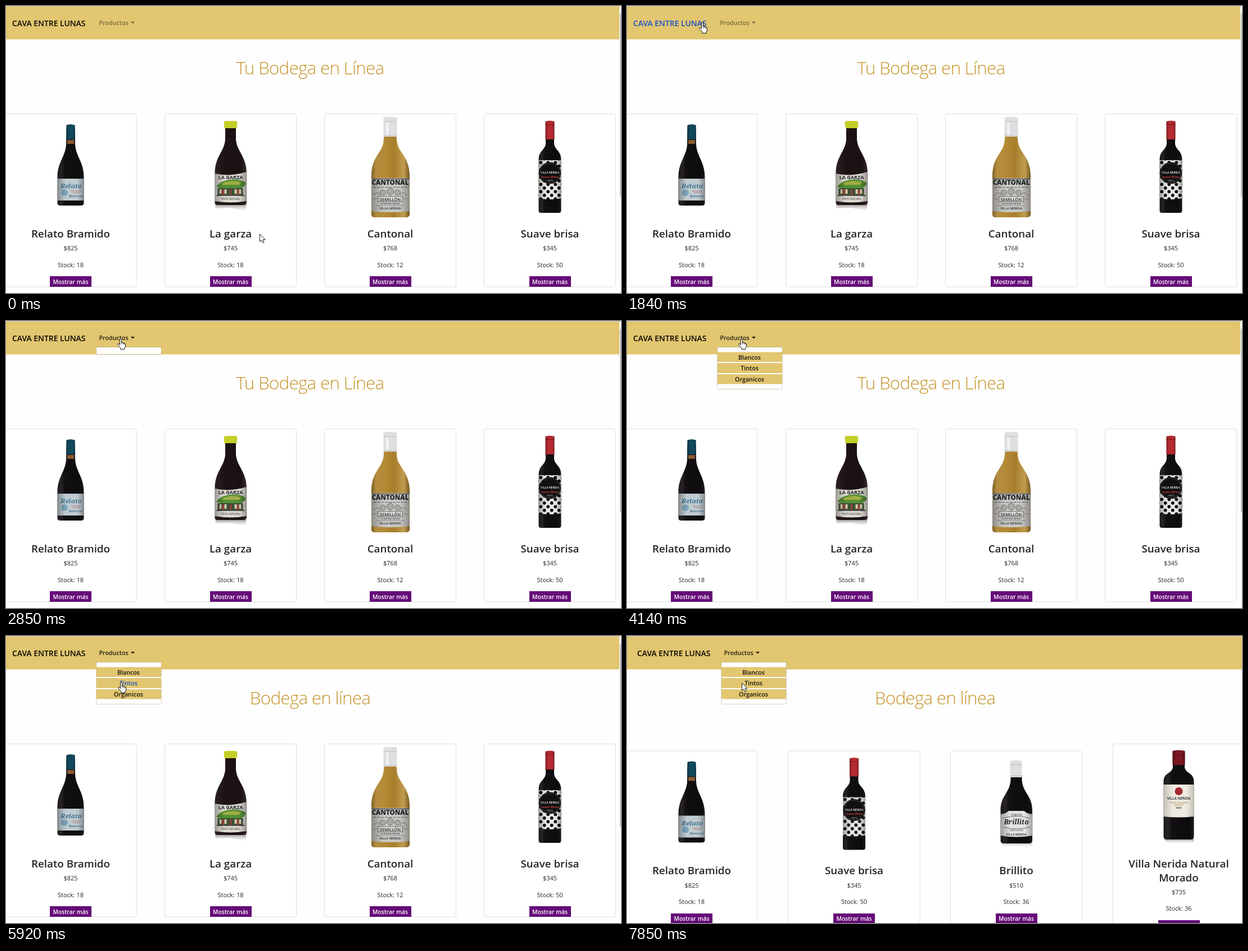
An HTML page that plays this animation: 1094x512 px, repeating every 8000 ms.

```html
<!DOCTYPE html>
<html lang="es">
<head>
<meta charset="utf-8">
<title>Bodega en línea</title>
<style>
  html, body { margin: 0; width: 100%; height: 100%; overflow: hidden; background: #fefefe; }
  svg { display: block; }
  text { font-family: "Open Sans", "Noto Sans", sans-serif; fill: #212529; white-space: pre; }
  .mid, .card text, .label text { text-anchor: middle; }
  .brand { font-size: 13.9px; font-weight: 600; fill: #080600; }
  .toggle { font-size: 10.7px; font-weight: 600; fill: inherit; }
  .title { font-size: 31.5px; font-weight: 300; letter-spacing: -.8px; fill: #c6952b; }
  .item { font-size: 10.7px; font-weight: 600; fill: #16140e; }
  .name { font-size: 18.8px; font-weight: 600; }
  .info { font-size: 11px; }
  .card .more { font-size: 10.3px; font-weight: 600; fill: #fff; }
  .label text { font-size: 6px; }
  .label .script { font-family: "Noto Serif", serif; font-style: italic; font-weight: 700; }

  .step { animation: 8s step-end infinite; }
  #front { animation-name: front; }
  #category { animation-name: category; }
  #header { animation-name: header; }
  #titleA { animation-name: titleA; }
  #titleB { animation-name: titleB; }
  #stub { animation-name: stub; }
  #menu { animation-name: menu; }
  #brand { animation-name: brand; }
  #toggle { animation-name: toggle; }
  #whites { animation-name: whites; }
  #reds { animation-name: reds; }
  #cursor { animation-name: cursor; }
  #arrow { animation-name: arrow; }
  #hand { animation-name: hand; }

  @keyframes front { 0% { visibility: visible } 77.875%, 100% { visibility: hidden } }
  @keyframes category { 0% { visibility: hidden } 77.875%, 100% { visibility: visible } }
  @keyframes header { 0% { transform: none } 77.875%, 100% { transform: translateX(7px) } }
  @keyframes titleA { 0% { visibility: visible } 74%, 100% { visibility: hidden } }
  @keyframes titleB { 0% { visibility: hidden } 74%, 100% { visibility: visible } }
  @keyframes stub { 0% { visibility: hidden } 33.875% { visibility: visible } 51.75%, 100% { visibility: hidden } }
  @keyframes menu { 0% { visibility: hidden } 51.75%, 100% { visibility: visible } }
  @keyframes brand { 0% { fill: #080600 } 15.75% { fill: #1c4fc8 } 24.875%, 100% { fill: #080600 } }
  @keyframes toggle { 0% { fill: #7a6a3c } 26.5% { fill: #4c4222 } 35.625%, 100% { fill: #231e10 } }
  @keyframes whites { 0% { fill: #16140e } 63.25% { fill: #1c4fc8 } 66.75%, 100% { fill: #16140e } }
  @keyframes reds { 0% { fill: #16140e } 66.75% { fill: #1c4fc8 } 77.875%, 100% { fill: #16140e } }
  @keyframes arrow { 0% { visibility: visible } 15.75% { visibility: hidden } 77.875%, 100% { visibility: visible } }
  @keyframes hand { 0% { visibility: hidden } 15.75% { visibility: visible } 77.875%, 100% { visibility: hidden } }
  @keyframes cursor {
    0% { transform: translate(451px, 406px) }
    6.25% { transform: translate(451px, 405px) }
    8.875% { transform: translate(392px, 280px) }
    10.5% { transform: translate(298px, 124px) }
    12.375% { transform: translate(158px, 44px) }
    14% { transform: translate(162px, 47px) }
    15.75% { transform: translate(115px, 29px) }
    17.625% { transform: translate(107px, 27px) }
    23% { transform: translate(128px, 29px) }
    24.875% { transform: translate(158px, 31px) }
    26.5% { transform: translate(195px, 31px) }
    28.375% { transform: translate(198px, 31px) }
    59.5% { transform: translate(199px, 31px) }
    61.375% { transform: translate(199px, 43px) }
    63.25% { transform: translate(198px, 55px) }
    64.875% { transform: translate(199px, 70px) }
    66.75% { transform: translate(199px, 81px) }
    68.625% { transform: translate(199px, 82px) }
    77.875%, 100% { transform: translate(204px, 83px) }
  }
</style>
</head>
<body>
<svg width="1094" height="512" viewBox="0 0 1094 512">
  <defs>
    <linearGradient id="glass">
      <stop offset="0" stop-color="#1a171a"/><stop offset=".14" stop-color="#272326"/>
      <stop offset=".28" stop-color="#110f12"/><stop offset=".85" stop-color="#0e0c0f"/>
      <stop offset="1" stop-color="#1d1a1d"/>
    </linearGradient>
    <linearGradient id="maroon">
      <stop offset="0" stop-color="#2b2022"/><stop offset=".3" stop-color="#1d1315"/>
      <stop offset=".8" stop-color="#1a1113"/><stop offset="1" stop-color="#33272a"/>
    </linearGradient>
    <linearGradient id="amber">
      <stop offset="0" stop-color="#7d5e22"/><stop offset=".12" stop-color="#b38d42"/>
      <stop offset=".35" stop-color="#b48a36"/><stop offset=".6" stop-color="#a87e2c"/>
      <stop offset=".85" stop-color="#c19c50"/><stop offset="1" stop-color="#75561d"/>
    </linearGradient>
    <linearGradient id="shade">
      <stop offset="0" stop-opacity=".3"/><stop offset=".3" stop-opacity="0"/>
      <stop offset=".75" stop-opacity="0"/><stop offset="1" stop-opacity=".3"/>
    </linearGradient>
    <linearGradient id="fade" x2="0" y2="1">
      <stop offset="0" stop-color="#77706c" stop-opacity=".7"/><stop offset="1" stop-color="#bbb" stop-opacity="0"/>
    </linearGradient>
    <pattern id="dots" width="13" height="13" x="-6.500" y="276" patternUnits="userSpaceOnUse">
      <rect width="13" height="13" fill="#e9e8e6"/>
      <g fill="#111"><circle cx="3.250" cy="3.250" r="2.900"/><circle cx="9.750" cy="9.750" r="2.900"/></g>
    </pattern>

    <g id="relato" class="label">
      <path fill="url(#glass)" d="M-7 212H7L8 247C9 268 23.500 278 23.500 305V352Q23.500 356 18 356H-18Q-23.500 356-23.500 352V305C-23.500 278-9 268-8 247Z"/>
      <path fill="#12485c" d="M-7.500 213Q0 209 7.500 213L8 238H-8Z"/>
      <path fill="url(#shade)" d="M-7.500 213Q0 209 7.500 213L8 238H-8Z"/>
      <path fill="#8a5a30" d="M-6 239H6V246H-6Z"/>
      <path fill="#bfcbd0" d="M-23 308H23V347H-23Z"/>
      <text class="script" y="325" x="1" style="font-size:11.500px;fill:#3d7391">Relato</text>
      <circle cx="-11" cy="333" r="6" fill="#7ba4bb"/>
      <path stroke="#b27b72" d="M1 330H18M4 333H16"/>
      <text class="script" x="9" y="341" style="fill:#3d6a8a">Reserva</text>
      <path fill="url(#shade)" d="M-23 308H23V347H-23Z"/>
    </g>

    <g id="garza" class="label">
      <path fill="url(#fade)" d="M-27 354H28L27 366L0 360L-27 361Z"/>
      <path fill="url(#maroon)" d="M-9.500 216H9.500V238C11 260 28.500 268 28.500 299V351Q28 355 23 355H-23Q-28 355-28 351V299C-28 268-11 260-9.500 238Z"/>
      <path fill="#c3cf28" d="M-12 209Q-12 205-8 205H8Q12 205 12 209L11 218H-11Z"/>
      <path fill="#dedbd2" d="M-28 299Q0 305 28 296V348Q0 353-28 348Z"/>
      <text y="308.500" style="font-size:9px;font-weight:700">LA GARZA</text>
      <path fill="#558f35" d="M-25 323C-19 307 20 306 27 316C24 329 2 330-25 323Z"/>
      <path fill="#9fae45" d="M-14 316Q4 309 19 315L15 319H-15Z"/>
      <path fill="#3b5138" d="M-23 325H22V337H-23Z"/>
      <path stroke="#d7c9aa" stroke-width="4" d="M-18 327V335M-9 327V335M9 327V335M17 327V335"/>
      <path stroke="#9d3d36" stroke-width="3" d="M-13 327V337M0 327V337M13 327V337"/>
      <path stroke="#222" stroke-width="1.500" d="M-25 338H25"/>
      <text y="346" style="font-size:4.500px">TINTO NATURAL</text>
      <path fill="url(#shade)" d="M-28 299Q0 305 28 296V348Q0 353-28 348Z"/>
    </g>

    <g id="cantonal" class="label">
      <path fill="url(#amber)" d="M-11 232H11L12 242C14 262 34.500 268 34.500 304V372Q34 377 28 377H-28Q-33.500 377-33.500 372V304C-33.500 268-14 262-12 242Z"/>
      <path fill="#dedfe0" d="M-12 199Q0 196 12 199V233H-12Z"/>
      <path stroke="#bfc0c2" d="M-12 206H12M-12 231H12"/>
      <path fill="#fff" opacity=".7" d="M-7 208H-3V230H-7Z"/>
      <path fill="#c9c8c4" d="M-33 307H34V366Q0 370-33 366Z"/>
      <path stroke="#222" d="M-33 308.500H34"/>
      <text y="319" style="font-size:11.500px;font-weight:800">CANTONAL</text>
      <path stroke="#555" stroke-dasharray="5 2" d="M-30 323.500H30"/>
      <g fill="#aaa9a4" stroke="#555" stroke-width=".7">
        <circle cx="-13" cy="333" r="5"/><circle cy="331" r="6"/><circle cx="13" cy="333" r="5"/>
        <path fill="none" d="M-30 338Q-22 328-18 338M30 338Q22 328 18 338M0 337V340"/>
      </g>
      <rect x="-22" y="340" width="44" height="9" fill="#d8d7d3" stroke="#444" stroke-width=".7"/>
      <text y="347.500" style="font-size:7.500px;font-weight:600">SEMILLÓN</text>
      <text y="354" style="font-size:4px">VENDIMIA TARDÍA</text>
      <path stroke="#777" stroke-width=".8" d="M-31 344H-24M24 344H31M-25 356H25"/>
      <text y="363" style="font-size:5.800px;font-weight:600">VILLA NERIDA</text>
      <path fill="url(#shade)" d="M-33 307H34V366Q0 370-33 366Z"/>
    </g>

    <g id="brisa" class="label">
      <path fill="url(#glass)" d="M-7.500 236H7.500V246C8.500 257 20 258 20 274V365Q20 369 16 369H-16Q-20 369-20 365V274C-20 258-8.500 257-7.500 246Z"/>
      <path fill="#b52a30" d="M-8 206Q0 203 8 206V238H-8Z"/>
      <path stroke="#7d171e" d="M-8 211.500H8"/>
      <path fill="url(#shade)" d="M-8 206Q0 203 8 206V238H-8Z"/>
      <path fill="url(#dots)" d="M-20 275H20V343Q0 347-20 343Z"/>
      <circle cy="298" r="19.500" fill="#111"/>
      <circle cy="298" r="17.500" fill="none" stroke="#888" stroke-width=".7" stroke-dasharray="2 1.500"/>
      <text y="299" style="font-size:5px;fill:#fff;font-weight:600">VILLA NERIDA</text>
      <text class="script" y="306.500" style="font-size:5.200px;fill:#d3403f">Suave Brisa</text>
      <text y="313" style="font-size:4px;fill:#ccc">TINTO</text>
      <path fill="url(#shade)" d="M-20 275H20V343Q0 347-20 343Z"/>
    </g>

    <g id="brillito" class="label">
      <path fill="url(#fade)" d="M-26 367H28V376H-24Z"/>
      <path fill="url(#glass)" d="M-10 248H10V256C11 280 28.500 284 28.500 311V365Q28 370 22 370H-22Q-28 370-28 365V311C-28 284-11 280-10 256Z"/>
      <path fill="#dedfe1" d="M-11 223Q0 220 10 223V252H-11Z"/>
      <path stroke="#b8b9bd" d="M-11 229.500H10M-11 249.500H10"/>
      <path fill="#e4e4e3" d="M-28 318Q-18 317-14 312H14Q18 317 29 318V356Q0 361-28 356Z"/>
      <text y="321" style="font-size:4.500px">COSECHA</text>
      <path fill="none" stroke="#555" stroke-width=".8" d="M-24 325Q0 318 24 325M-24 341Q0 347 24 341"/>
      <text class="script" y="336" style="font-size:12px">Brillito</text>
      <text y="348" style="font-size:4px">TINTO JOVEN</text>
      <text y="356" style="font-size:5.500px;font-weight:600">VILLA NERIDA</text>
      <path fill="url(#shade)" d="M-28 318Q-18 317-14 312H14Q18 317 29 318V356Q0 361-28 356Z"/>
    </g>

    <g id="nerida" class="label">
      <path fill="url(#fade)" d="M-25 362H27V370H-22Z"/>
      <path fill="url(#glass)" d="M-10.500 226H10.500V234C12 246 27 243 27 260V358Q27 363 21 363H-21Q-27 363-27 358V260C-27 243-12 246-10.500 234Z"/>
      <path fill="#7c1722" d="M-11 205Q0 202 11 205V230H-11Z"/>
      <path stroke="#54101a" d="M-11 212.500H11"/>
      <path fill="url(#shade)" d="M-11 205Q0 202 11 205V230H-11Z"/>
      <path fill="#eeeadf" d="M-27 265H27V322Q0 325-27 322Z"/>
      <circle cy="277" r="7" fill="#a52a2d"/>
      <text y="292" style="font-size:6.300px;font-weight:600">VILLA NERIDA</text>
      <text class="script" y="298.500" style="font-size:4.800px;font-weight:400;fill:#a3844e">Tinto morado</text>
      <text class="script" y="303" style="font-size:4.500px;font-weight:400;fill:#a3844e">natural</text>
      <text y="308" style="font-size:4px;font-weight:700">SECO</text>
      <path fill="url(#shade)" opacity=".6" d="M-27 265H27V322Q0 325-27 322Z"/>
    </g>
  </defs>

  <rect width="1094" height="512" fill="#fefefe"/>
  <rect y="1" width="1094" height="58.500" fill="#e2c670"/>
  <rect width="1094" height="1" fill="#d2d2d2"/>

  <g id="front" class="step">
    <rect x="1091" y="1" width="3" height="511" fill="#fafafa"/>
    <rect x="1092" y="14" width="2" height="326" fill="#c4c4c4"/>
  </g>
  <g id="category" class="step"></g>

  <g id="header" class="step">
    <text id="brand" class="brand step" x="11" y="36">CAVA ENTRE LUNAS</text>
    <g id="toggle" class="step">
      <text class="toggle" x="165.500" y="34">Productos</text>
      <path d="M222 28H229L225.500 31.800Z"/>
    </g>
    <text id="titleA" class="title mid step" x="541" y="122">Tu Bodega en Línea</text>
    <text id="titleB" class="title mid step" x="541" y="122">Bodega en línea</text>
    <rect id="stub" class="step" x="160.500" y="46.500" width="116" height="13" rx="2.500" fill="#fff" stroke="#c9b57b"/>
    <g id="menu" class="step">
      <rect x="160.500" y="46.500" width="116" height="75" rx="2.500" fill="#fff" stroke="#d4d2cb"/>
      <path fill="none" stroke="#c9b57b" d="M160.500 59V49Q160.500 46.500 163 46.500H274Q276.500 46.500 276.500 49V59"/>
      <path fill="#e2c670" d="M161 55.500H276V73H161ZM161 75H276V93H161ZM161 95H276V112.500H161Z"/>
      <text id="whites" class="item mid step" x="218" y="68.500">Blancos</text>
      <text id="reds" class="item mid step" x="218" y="88">Tintos</text>
      <text class="item mid" x="218" y="107.700">Organicos</text>
    </g>
  </g>

  <g id="cursor" class="step">
    <path id="arrow" class="step" fill="#fff" stroke="#222" d="M.5.8V14.500L3.600 11.600L5.800 16.500L8 15.500L5.900 10.800H10.300Z"/>
    <g id="hand" class="step" stroke="#111" stroke-linejoin="round">
      <path fill="#fff" d="M4.500 2Q4.500.5 6 .5T7.500 2V7Q9.800 6 10 8Q12 7 12.300 9Q14.500 8.600 14.500 11V14Q14.300 16 12.800 17.500V19.500H6V17.500L1 11.500Q.2 9.800 1.500 9.300Q3 9 4.500 11.500Z"/>
      <path fill="none" stroke-width=".8" d="M7.500 7V10.500M10 8V10.800M12.300 9V11"/>
    </g>
  </g>
</svg>
<script>
  const front = [
    { x: 115, art: "relato", name: ["Relato Bramido"], price: 825, stock: 18 },
    { x: 399.5, art: "garza", name: ["La garza"], price: 745, stock: 18 },
    { x: 683.5, art: "cantonal", name: ["Cantonal"], price: 768, stock: 12 },
    { x: 967.5, art: "brisa", name: ["Suave brisa"], price: 345, stock: 50 }
  ];
  const reds = [
    { x: 115, y: 12.5, art: "relato", name: ["Relato Bramido"], price: 825, stock: 18 },
    { x: 404, y: 12.5, art: "brisa", name: ["Suave brisa"], price: 345, stock: 50 },
    { x: 692.5, y: 12.5, art: "brillito", artY: -12.5, name: ["Brillito"], price: 510, stock: 36 },
    { x: 981.5, art: "nerida", name: ["Villa Nerida Natural", "Morado"], price: 735, stock: 36 }
  ];

  function card({ x, y = 0, art, artY = 0, name, price, stock }) {
    const extra = (name.length - 1) * 24.5;
    const lines = name.map((line, i) => `<text class="name" y="${412.5 + i * 25}">${line}</text>`).join("");
    return `<g class="card" transform="translate(${x} ${y})">
      <rect x="-117" y="192.5" width="234" height="${308.5 + extra}" rx="3" fill="#fff" stroke="#dfdfdf"/>
      <use href="#${art}" y="${artY}"/>${lines}
      <g transform="translate(0 ${extra})">
        <text class="info" y="436">$${price}</text>
        <text class="info" y="465.5">Stock: ${stock}</text>
        <rect x="-37" y="482" width="74" height="19" fill="#650b78" shape-rendering="crispEdges"/>
        <text class="more" y="495.5">Mostrar más</text>
      </g>
    </g>`;
  }

  const fill = (id, cards) =>
    document.getElementById(id).insertAdjacentHTML("beforeend", cards.map(card).join(""));
  fill("front", front);
  fill("category", reds);
</script>
</body>
</html>
```
